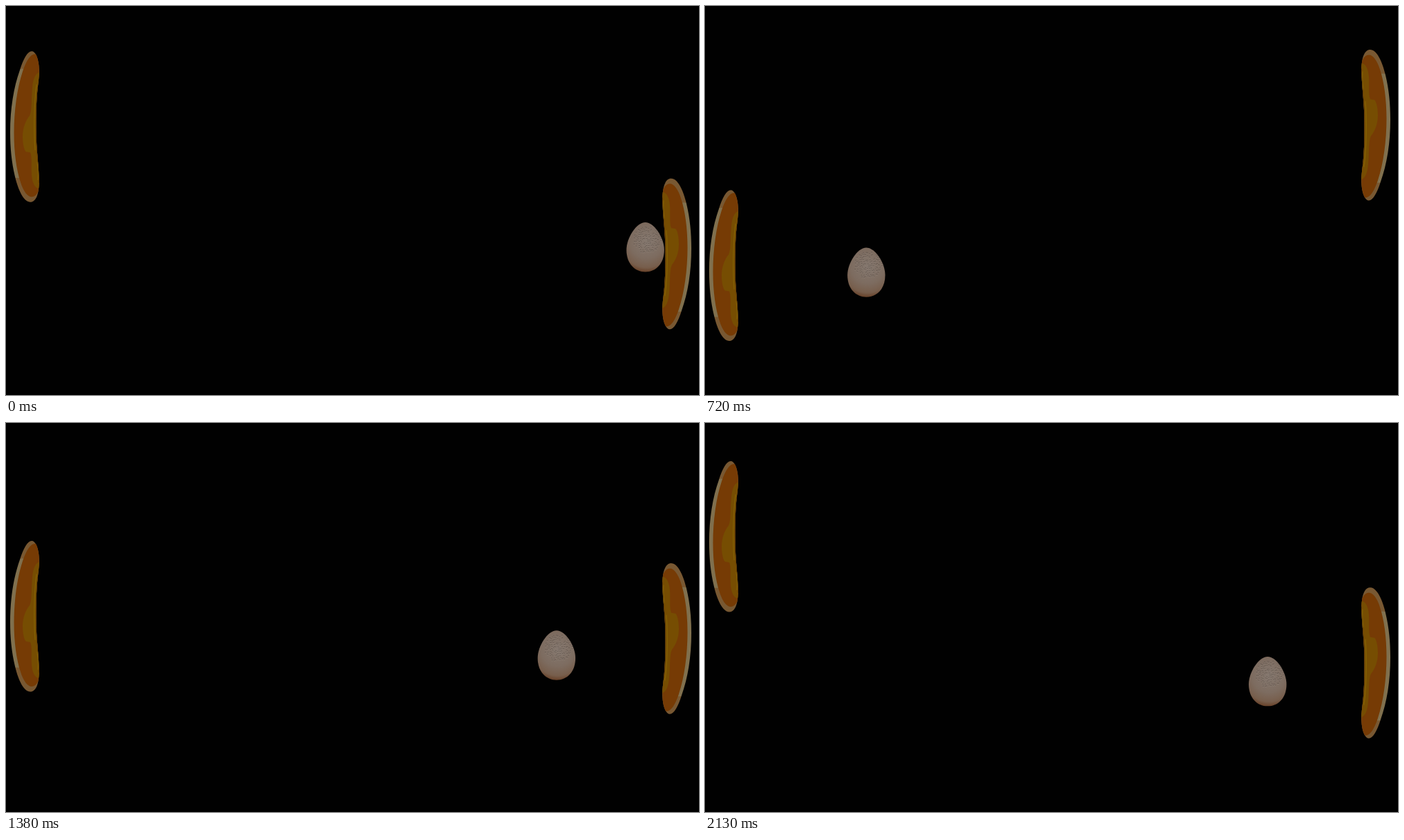
An HTML page that plays this animation: 998 by 561 pixels, repeating every 2160 ms.

```html
<!DOCTYPE html>
<html lang="en">
<head>
<meta charset="utf-8">
<title>Egg rally</title>
<style>
  html, body { margin: 0; width: 100%; height: 100%; overflow: hidden; background: #010101; }
  svg { display: block; width: 100vw; height: 100vh; }
</style>
</head>
<body>
<svg viewBox="0 0 998 561">
  <defs>
    <path id="outline" d="M37 0C42 0 46 8 47.3 20C48.6 31 47 41 45.8 52C43.4 73 43 105 43.8 126C44.5 148 48 172 47.6 190C47.2 207 43 217.5 35 217.5C26 217.5 18 202 13 181C8 160 6 139 6 117C6 83 11 52 20 27C25 11 31 0 37 0Z"/>
    <clipPath id="inside"><use href="#outline"/></clipPath>
    <linearGradient id="rind" x1="0" y1="0" x2="0" y2="217.5" gradientUnits="userSpaceOnUse">
      <stop offset=".115" stop-color="#785832"/>
      <stop offset=".12" stop-color="#80704e"/>
      <stop offset=".838" stop-color="#80704e"/>
      <stop offset=".843" stop-color="#785832"/>
    </linearGradient>
    <g id="slice">
      <use href="#outline" fill="url(#rind)"/>
      <g clip-path="url(#inside)">
        <path fill="#763b05" d="M50 4L42 4C35 4 29 14 24 29C16 53 11.5 86 11.5 118C11.5 146 15 171 21 189C25 202 31 210 37 210C41 210 44 207 46 203L50 204Z"/>
        <path fill="#764d02" d="M50 30C43 30 39 39 38 52C36 70 38 84 34 93C28 100 24 111 24 123C24 133 26 143 29 145L35 146C38 153 36 167 37 179C38 191 42 197 47 198L50 198Z"/>
        <path fill="none" stroke="#836104" stroke-width="1.3" d="M44 48C40 78 40 118 42 143M45 160Q47 175 46 186"/>
        <path fill="none" stroke="#4e2c04" stroke-width="1" d="M45.8 52C43.4 73 43 105 43.8 126C44.5 148 48 172 47.6 190"/>
      </g>
    </g>
    <radialGradient id="shell" cx="2" cy="-8" r="44" gradientUnits="userSpaceOnUse">
      <stop offset="0" stop-color="#85786f"/>
      <stop offset=".55" stop-color="#7d6c60"/>
      <stop offset=".85" stop-color="#775e4c"/>
      <stop offset="1" stop-color="#684128"/>
    </radialGradient>
  </defs>
  <use id="left" href="#slice"/>
  <g id="right"><use href="#slice" transform="translate(993 217.5) rotate(180)"/></g>
  <g id="egg">
    <path fill="url(#shell)" d="M0-35.7C13-35.7 27.2-13 27.2 4C27.2 24 15 35.7 0 35.7C-15 35.7-27.2 24-27.2 4C-27.2-13-13-35.7 0-35.7Z"/>
    <path id="pits" fill="none" stroke="#463c36" stroke-width=".8" opacity=".65"/>
    <path id="glints" fill="none" stroke="#9a8d84" stroke-width=".8" opacity=".6"/>
  </g>
</svg>
<script>
const LOOP = 2160, STEP = 30;
const $ = id => document.getElementById(id);

// Turning points of the rally; the loop cuts in and out mid-swing.
const turns = [
  { at: -8,   x: 921.2, y: 347.7, left: 65,    right: 249 },
  { at: 518,  x: 71,    y: 398.3, left: 293.5, right: 24 },
  { at: 1222, x: 921.2, y: 323.4, left: 146.5, right: 229 },
  { at: 1844, x: 71,    y: 400.2, left: 301.5, right: 51.5 },
  { at: 2218, x: 921.2, y: 368.5, left: 18,    right: 265 }
];

function random(seed) {
  return () => (seed = (seed * 16807) % 2147483647) / 2147483647;
}

function texture() {
  const rnd = random(71);
  let pits = '', glints = '';
  for (let y = -30; y < 12; y += 2.7) {
    for (let x = -20; x < 24; x += 2.9) {
      const px = x + rnd() * 2.2, py = y + rnd() * 1.8;
      const reach = Math.hypot((px - 2) / 20, (py + 11) / 20);
      if (reach > 1 || rnd() < 0.12) continue;
      const bend = `q.8 ${(0.3 + rnd() * 0.6).toFixed(1)} 1.6 0`;
      pits += `M${px.toFixed(1)} ${py.toFixed(1)}${bend}`;
      glints += `M${px.toFixed(1)} ${(py + 1).toFixed(1)}${bend}`;
    }
  }
  $('pits').setAttribute('d', pits);
  $('glints').setAttribute('d', glints);
}

function move(id, x, y) {
  $(id).setAttribute('transform', `translate(${x.toFixed(2)} ${y.toFixed(2)})`);
}

function draw(time) {
  const t = Math.floor((time % LOOP) / STEP) * STEP;
  const next = turns.findIndex(turn => turn.at > t);
  const a = turns[next - 1], b = turns[next];
  const eased = (1 - Math.cos(Math.PI * (t - a.at) / (b.at - a.at))) / 2;
  const mix = key => a[key] + (b[key] - a[key]) * eased;
  move('left', 0, mix('left'));
  move('right', 0, mix('right'));
  move('egg', mix('x'), mix('y'));
}

texture();
const start = performance.now();
function tick() {
  draw(performance.now() - start);
  requestAnimationFrame(tick);
}
tick();
</script>
</body>
</html>
```
